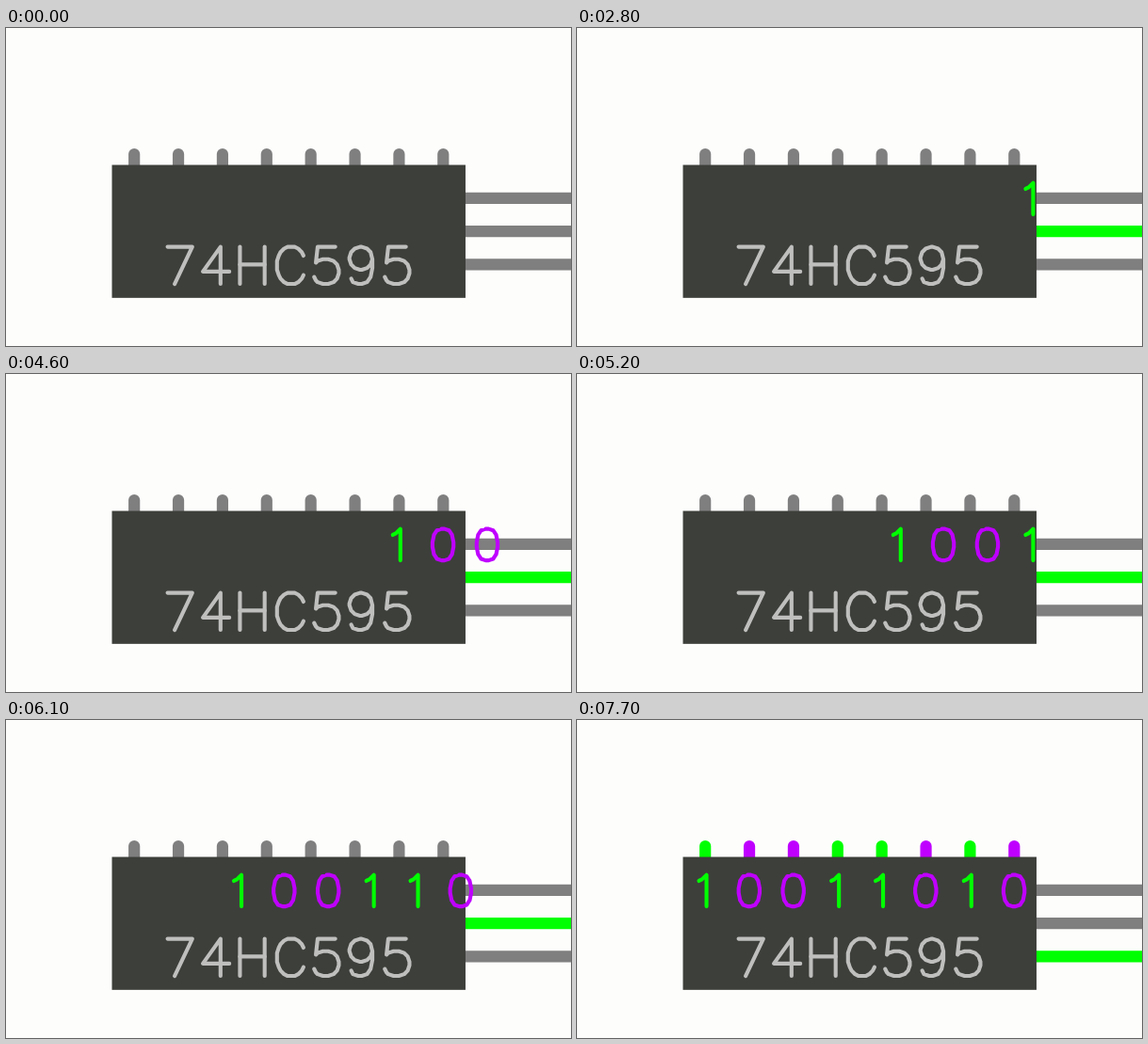
An HTML page with a canvas for the animation above (8000 ms loop, 600 by 338 pixels).

```html
<!DOCTYPE html>
<html lang="en">
<head>
<meta charset="utf-8">
<title>74HC595 shift register</title>
<style>
  html, body { margin: 0; width: 100%; height: 100%; overflow: hidden; background: #fdfefc; }
  canvas { display: block; width: 100%; height: 100%; }
</style>
</head>
<body>
<canvas id="stage" width="600" height="338" role="img" aria-label="74HC595"></canvas>
<script>
const canvas = document.getElementById('stage');
const ctx = canvas.getContext('2d');

const LOOP = 8000, HOLD = 100, FPS = 24;
const W = 1280, H = 720;              // drawing units
const PITCH = 100, LAST_PIN = 990, BITS = '10011010';
const WAIT_X = LAST_PIN + PITCH, START_X = W + PITCH;
const ENTER = 6, SHIFT = 5;           // ticks per phase
const LATCH_TICK = 178;
const WIRES = [385.5, 460.5, 535.5];

const COLOR = {
  back: '#fdfefc', chip: '#3d3f3b', wire: '#7f7f7f',
  label: '#bfc0be', on: '#00ff00', off: '#bf00ff'
};

const mirrorX = pts => pts.concat(pts.map(([x, y]) => [20 - x, y]).reverse());
const mirrorY = pts => pts.concat(pts.map(([x, y]) => [x, 21 - y]).reverse());
const points = text => text.split(' ').map(p => p.split(',').map(Number));

// Single-stroke letters on a grid 21 units high, y pointing up.
const GLYPHS = {
  0: { w: 20, lines: [mirrorX(mirrorY(points('9,21 6,20 4,17 3,12'))).concat([[9, 21]])] },
  1: { w: 20, lines: [points('6,17 8,18 11,21 11,0')] },
  4: { w: 20, lines: [points('13,0 13,21 3,7 18,7')] },
  5: { w: 20, lines: [points('15,21 5,21 4,12 5,13 8,14 11,14 14,13 16,11 17,8 17,6 16,3 14,1 11,0 8,0 5,1 4,2 3,4')] },
  7: { w: 20, lines: [points('3,21 17,21 7,0')] },
  9: { w: 20, lines: [points('16,14 15,11 13,9 10,8 9,8 6,9 4,11 3,14 3,15 4,18 6,20 9,21 10,21 13,20 15,18 16,14 16,9 15,4 13,1 10,0 8,0 5,1 4,3')] },
  H: { w: 22, lines: [points('4,21 4,0'), points('18,21 18,0'), points('4,11 18,11')] },
  C: { w: 21, lines: [mirrorY(points('18,16 17,18 15,20 13,21 9,21 7,20 5,18 4,16 3,13'))] }
};

// Each bit slides in, waits for the clock, then moves one place left.
const schedule = [...BITS].map((bit, i) => {
  if (i === 0) return { enter: 9, clock: 41, shift: 64 };
  const enter = 93 + (i - 1) * (ENTER + SHIFT);
  return { enter, clock: enter + ENTER, shift: enter + ENTER };
});

const progress = (tick, start, length) => Math.min(1, Math.max(0, (tick - start) / length));

function stroke(pts, color, width) {
  ctx.strokeStyle = color;
  ctx.lineWidth = width;
  ctx.beginPath();
  pts.forEach(([x, y]) => ctx.lineTo(x, y));
  ctx.stroke();
}

function drawText(text, center, base, size, color) {
  const total = [...text].reduce((sum, c) => sum + GLYPHS[c].w, 0);
  let left = center - total * size / 2;
  for (const c of text) {
    for (const line of GLYPHS[c].lines) {
      stroke(line.map(([x, y]) => [left + x * size, base - y * size]), color, 8.8);
    }
    left += GLYPHS[c].w * size;
  }
}

function draw(time) {
  const held = Math.floor((time % LOOP + 0.5) / HOLD) * HOLD;
  const tick = Math.floor(held * FPS / 1000 + 1e-6);
  const latched = tick >= LATCH_TICK;
  const clocked = schedule.some(s => tick >= s.clock && tick < s.shift + SHIFT);
  const bitColor = i => BITS[i] === '1' ? COLOR.on : COLOR.off;

  ctx.setTransform(canvas.width / W, 0, 0, canvas.height / H, 0, 0);
  ctx.lineCap = ctx.lineJoin = 'round';
  ctx.fillStyle = COLOR.back;
  ctx.fillRect(0, 0, W, H);

  WIRES.forEach((y, i) => {
    const live = (i === 1 && clocked) || (i === 2 && latched);
    stroke([[1040, y], [W + 30, y]], live ? COLOR.on : COLOR.wire, 26);
  });
  for (let i = 0; i < BITS.length; i++) {
    const x = LAST_PIN - (BITS.length - 1 - i) * PITCH + 0.5;
    stroke([[x, 285.5], [x, 330]], latched ? bitColor(i) : COLOR.wire, 26);
  }

  ctx.fillStyle = COLOR.chip;
  ctx.fillRect(240, 310, 801, 301);
  drawText('74HC595', 640, 579.5, 4, COLOR.label);

  schedule.forEach((s, i) => {
    if (tick < s.enter) return;
    let x = START_X + (WAIT_X - START_X) * progress(tick, s.enter, ENTER);
    for (const step of schedule.slice(i)) x -= PITCH * progress(tick, step.shift, SHIFT);
    drawText(BITS[i], x, 422, 3.4, bitColor(i));
  });
}

const begin = performance.now();
function loop() {
  draw(performance.now() - begin);
  requestAnimationFrame(loop);
}
loop();
</script>
</body>
</html>
```
